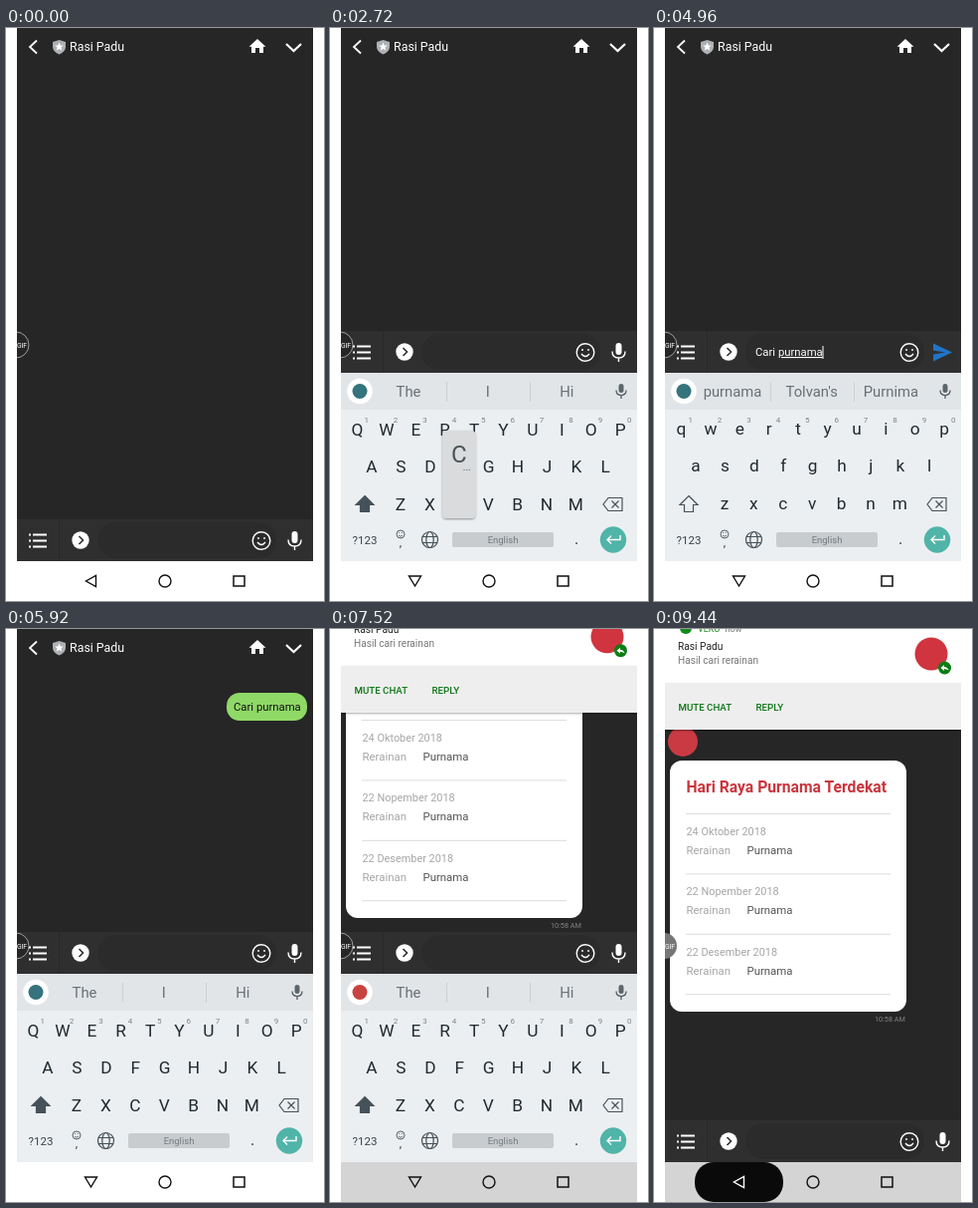
Animation of 320x575 px, one loop 9600 ms. Source, as an HTML page:

```html
<!DOCTYPE html>
<html lang="id">
<head>
<meta charset="utf-8">
<title>Chat</title>
<style>
html, body { margin: 0; height: 100%; overflow: hidden; background: #fff; }
svg { display: block; width: 100vw; height: 100vh; font-family: Roboto, sans-serif; }
text { white-space: pre; }
.mid { text-anchor: middle; }
.thin { fill: none; stroke: #fff; stroke-width: 1.4; }
.key { fill: none; stroke: #46525a; stroke-width: 1.2; }
</style>
</head>
<body>
<svg viewBox="0 0 320 575">
  <defs>
    <clipPath id="phone"><rect x="11" width="298" height="575"/></clipPath>
    <filter id="shade" x="-20%" y="-20%" width="140%" height="150%">
      <feDropShadow dx="0" dy="1" stdDeviation="1.2" flood-opacity=".4"/>
    </filter>
  </defs>
  <rect width="320" height="575" fill="#fff"/>
  <g clip-path="url(#phone)">
    <rect x="11" width="298" height="535" fill="#262626"/>

    <g id="chat">
      <g id="sent">
        <rect x="222" y="64" width="81" height="28" rx="13" fill="#8fd967"/>
        <text x="229" y="82" font-size="11.3" fill="#111">Cari purnama</text>
      </g>
      <g id="reply">
        <circle cx="29" cy="113" r="15" fill="#c93a43"/>
        <rect x="16" y="132" width="238" height="252" rx="12" fill="#fff"/>
        <text x="32.5" y="164" font-size="15.7" font-weight="700" fill="#c9353d">Hari Raya Purnama Terdekat</text>
        <g id="days"></g>
        <text x="253" y="394" font-size="7.3" fill="#858585" text-anchor="end">10:58 AM</text>
      </g>
    </g>
    <rect id="scrollbar" x="306" y="187" width="3" height="117" fill="#777"/>

    <rect x="11" width="298" height="38" fill="#262626"/>
    <path class="thin" d="M31 12.5L24 19l7 6.5" style="stroke-width:1.8"/>
    <path d="M53.5 12l6.5 2v5q0 5-6.5 7.5Q47 24 47 19v-5z" fill="#aeb1b4"/>
    <path d="M53.5 14.5l1.2 2.9 3.1.2-2.4 2 .8 3-2.7-1.7-2.7 1.7.8-3-2.4-2 3.1-.2z" fill="#fff"/>
    <text x="64" y="23" font-size="12.4" fill="#fff">Rasi Padu</text>
    <path d="M253 11l8.5 7.8h-2.5V25h-4v-5h-4v5h-4v-6.2h-2.5z" fill="#fff"/>
    <path class="thin" d="M282 16l7.5 7 7.5-7" style="stroke-width:2.2"/>

    <g id="bar">
      <rect x="11" y="493" width="298" height="42" fill="#2f2f2f"/>
      <rect x="53" y="493" width="1" height="42" fill="#292929"/>
      <rect x="92" y="496" width="180" height="36" rx="18" fill="#2b2b2b"/>
      <path class="thin" d="M27 508.500h14M27 514.500h14M27 520.500h14M23 508.500h2M23 514.500h2M23 520.500h2" style="stroke-width:2"/>
      <circle cx="75" cy="514" r="8.7" fill="#fff"/>
      <path class="thin" d="M73.5 510l4 4-4 4" style="stroke:#2f2f2f;stroke-width:1.6"/>
      <text x="102" y="518" font-size="11.3" fill="#fff"><tspan id="done"></tspan><tspan id="word" text-decoration="underline"></tspan></text>
      <rect id="caret" x="169.5" y="508" width="1" height="13" fill="#fff"/>
      <g class="thin">
        <circle cx="257" cy="514.5" r="8.8"/>
        <path d="M253 516q4 5 8 0M254 511v2M260 511v2"/>
      </g>
      <g id="mic">
        <rect x="287.5" y="505" width="6" height="12" rx="3" fill="#fff"/>
        <path class="thin" d="M284 513.5q0 6.5 6.5 6.5t6.5-6.5M290.5 520v4"/>
      </g>
      <path id="send" d="M281 505.5l19 9-19 9v-7l12-2-12-2z"/>
    </g>

    <g id="board">
      <rect x="11" y="346" width="298" height="189" fill="#eceff1"/>
      <rect x="11" y="346" width="298" height="37" fill="#e2e5e8"/>
      <circle cx="30" cy="364.5" r="12.8" fill="#fff"/>
      <circle id="dot" cx="30" cy="364.5" r="7.5"/>
      <rect x="290.5" y="357" width="5" height="9" rx="2.5" fill="#5c666c"/>
      <path class="key" d="M288 363.5q0 5 5 5t5-5M293 368v4"/>
      <g id="hints"></g>
      <g id="keys"></g>
      <path id="shift" class="key" d="M35 469.5l9 9h-4.5v7h-9v-7H26z"/>
      <path class="key" d="M280 471.5h14v13h-14l-5-6.5zM283.5 474.5l7 7M290.5 474.5l-7 7"/>
      <text x="35" y="518" class="mid" font-size="11.5" fill="#37424a">?123</text>
      <circle class="key" cx="71" cy="508" r="4" style="stroke-width:.9"/>
      <path class="key" d="M69 509q2 2.5 4 0M69.7 506v1M72.3 506v1" style="stroke-width:.8"/>
      <text x="71" y="520" class="mid" font-size="12" fill="#37424a">,</text>
      <g class="key">
        <circle cx="100.5" cy="513.5" r="8"/>
        <ellipse cx="100.5" cy="513.5" rx="3.7" ry="8"/>
        <path d="M93 510.5h15M93 516.5h15"/>
      </g>
      <rect x="123" y="506" width="102" height="15" rx="2" fill="#c8ccce"/>
      <text x="174" y="517" class="mid" font-size="9.5" fill="#737b80">English</text>
      <text x="248" y="518" class="mid" font-size="16" fill="#263238">.</text>
      <circle cx="285" cy="513.5" r="13.2" fill="#50b4a8"/>
      <path class="thin" d="M292 509v4.5h-13M283 509.5l-4 4 4 4"/>
    </g>

    <g id="popup" filter="url(#shade)">
      <rect x="-16.5" y="-74" width="33" height="88" rx="4" fill="#d9dbdd"/>
      <text id="glyph" y="-42" class="mid" font-size="24" fill="#4b5256"></text>
      <text x="8" y="-34" class="mid" font-size="10" fill="#4b5256">...</text>
    </g>

    <g id="knob">
      <circle id="disc" cx="10" cy="318" r="13" stroke-width=".8"/>
      <text x="16" y="321" class="mid" font-size="6.8" fill="#fff">GIF</text>
    </g>

    <rect id="nav" x="11" y="535" width="298" height="40"/>
    <rect id="ripple" y="535" height="40" rx="19"/>
    <path id="back" fill="none" stroke-width="1.4"/>
    <circle cx="160" cy="555" r="6" fill="none" stroke="#111" stroke-width="1.4"/>
    <rect x="229" y="550" width="11" height="10" fill="none" stroke="#111" stroke-width="1.5"/>

    <g id="notice">
      <rect x="11" y="-20" width="298" height="121" fill="#fff" filter="url(#shade)"/>
      <rect x="11" y="54" width="298" height="47" fill="#eee"/>
      <circle cx="32" cy="-1" r="6" fill="#138a1c"/>
      <text x="44" y="2.5" font-size="9" fill="#138a1c">VEKO</text>
      <text x="67" y="2.5" font-size="9" fill="#777">· now</text>
      <text x="24" y="21" font-size="10.2" fill="#222">Rasi Padu</text>
      <text x="24" y="35" font-size="10.1" fill="#777">Hasil cari rerainan</text>
      <circle cx="279" cy="25" r="16.5" fill="#d0343e"/>
      <circle cx="292.5" cy="39" r="6.5" fill="#0b7d13"/>
      <path d="M288.5 39l3.5-3v2q3.5 0 4.5 3.5-2-1.5-4.5-1.5v2z" fill="#fff"/>
      <g font-size="9.7" font-weight="500" fill="#0b7414">
        <text x="24.5" y="82">MUTE CHAT</text><text x="102.5" y="82">REPLY</text>
      </g>
    </g>
  </g>
</svg>
<script>
const LOOP = 9600, STEP = 160, BOARD = 189;
const $ = id => document.getElementById(id);
const set = (id, props) => { for (const k in props) $(id).setAttribute(k, props[k]); };
const show = (id, on) => { $(id).style.display = on ? '' : 'none'; };
const clamp = v => Math.max(0, Math.min(1, v));
const ease = v => 1 - (1 - clamp(v)) ** 2;
const text = (x, y, size, fill, str, more = '') =>
  `<text x="${x}" y="${y}" font-size="${size}" fill="${fill}" ${more}>${str}</text>`;

$('days').innerHTML = ['24 Oktober 2018', '22 Nopember 2018', '22 Desember 2018', ''].map((day, i) => {
  const y = 185 + i * 60.4;
  return `<rect x="32" y="${y}" width="206" height="1" fill="#ddd"/>` + (day &&
    text(32.5, y + 22, 10.9, '#a6a6a6', day) +
    text(32.5, y + 41, 11.4, '#a6a6a6', 'Rerainan') +
    text(93.5, y + 41, 11.4, '#545454', 'Purnama'));
}).join('');

// Keyboard letters and their centres
const spots = {};
[['qwertyuiop', 27.5, 403], ['asdfghjkl', 42, 440], ['zxcvbnm', 71, 478]].forEach(([row, x0, y]) =>
  [...row].forEach((c, i) => { spots[c] = [x0 + i * 29.4, y]; }));
$('keys').innerHTML = Object.entries(spots).map(([c, [x, y]]) =>
  text(x, y + 6, 17.3, '#202a30', c, 'class="mid letter"')).join('') +
  [...'1234567890'].map((d, i) => text(36.7 + i * 29.4, 396, 8, '#7b8388', d, 'class="mid"')).join('');
const letters = [...document.querySelectorAll('.letter')];

const presses = [[2720, 'C'], [3040, 'a'], [3200, 'r'], [3360, 'i'], [3680, ' '], [3840, 'p'],
  [4160, 'u'], [4320, 'r'], [4480, 'n'], [4640, 'a'], [4800, 'm'], [4880, 'a']];
const release = t => (Math.floor(t / STEP) + 1) * STEP;
const guesses = {
  '': 'The I Hi', C: 'C Can Call', Ca: 'Ca Can Call', Car: 'Car Care Card', Cari: 'Cari Caring Carbon',
  p: 'p please people', pu: 'pu put pull', pur: 'pur pure purple', purn: 'purn pure purple',
  purna: 'purna purnama Purnima', purnama: "purnama Tolvan's Purnima"
};

function hints(word, on) {
  const words = on ? (guesses[word] || guesses.purna).split(' ') : [];
  return words.map((w, i) => text(79 + i * 79.7, 370, 14.8, '#687075', w, 'class="mid"')).join('') +
    (on ? [117, 201].map(x => `<rect x="${x}" y="355" width="1" height="20" fill="#cbd0d3"/>`).join('') : '');
}

let last = -1;
function draw(t) {
  if (t === last) return;
  last = t;
  const open = t < 9120 ? (t < 1600 ? 0 : ease((t - 1440) / 480)) : 1 - clamp((t - 9120) / 320);
  const typed = t < 5280 ? presses.filter(p => release(p[0]) <= t).map(p => p[1]).join('') : '';
  const cut = typed.lastIndexOf(' ') + 1, word = typed.slice(cut);
  const caps = !typed;

  set('bar', { transform: `translate(0 ${-BOARD * open})` });
  set('board', { transform: `translate(0 ${BOARD * (1 - open)})` });
  $('done').textContent = typed.slice(0, cut);
  $('word').textContent = word;
  show('caret', t >= 4960 && t < 5280);
  show('mic', caps);
  show('send', !caps);
  set('send', { fill: t < 4960 ? '#319dc2' : '#2175c8' });

  letters.forEach(el => {
    const c = el.textContent.toLowerCase(), y = spots[c][1];
    el.textContent = caps ? c.toUpperCase() : c;
    el.setAttribute('y', y + (caps ? 6 : 4.5));
  });
  set('shift', { style: caps ? 'fill:#46525a' : '' });
  $('hints').innerHTML = hints(word, t < 9120);
  set('dot', { fill: t < 6880 ? '#35737d' : '#c8433f' });

  const down = presses.find(p => p[0] <= t && t < release(p[0]) && p[1] !== ' ');
  show('popup', down);
  if (down) {
    set('popup', { transform: `translate(${spots[down[1].toLowerCase()]})` });
    $('glyph').textContent = down[1];
  }

  show('sent', t >= 5760);
  show('reply', t >= 6880);
  set('chat', { transform: `translate(0 ${t < 6880 ? 0 : -94 * open})` });
  show('scrollbar', t >= 6880 && t < 7360);

  show('notice', t >= 7200);
  set('notice', { transform: `translate(0 ${-108 * (1 - ease((t - 7040) / 800))})` });

  const held = t >= 9120, grow = clamp((t - 9120) / 320);
  set('nav', { fill: t < 7200 ? '#fff' : '#d4d4d4' });
  show('ripple', held);
  set('ripple', { x: 50 - 9 * grow, width: 71 + 18 * grow, fill: grow < 1 ? '#202020' : '#0a0a0a' });
  set('back', {
    d: open > 0 ? 'M79.5 550h12L85.5 560z' : 'M90.5 549.5v11L80.5 555z',
    stroke: held ? '#fff' : '#111'
  });
  const lit = t >= 9440;
  set('disc', { fill: lit ? '#777' : '#262626', stroke: lit ? 'none' : '#bbb' });
}

function tick() {
  draw(Math.floor(performance.now() % LOOP / STEP) * STEP);
  requestAnimationFrame(tick);
}
tick();
</script>
</body>
</html>
```
